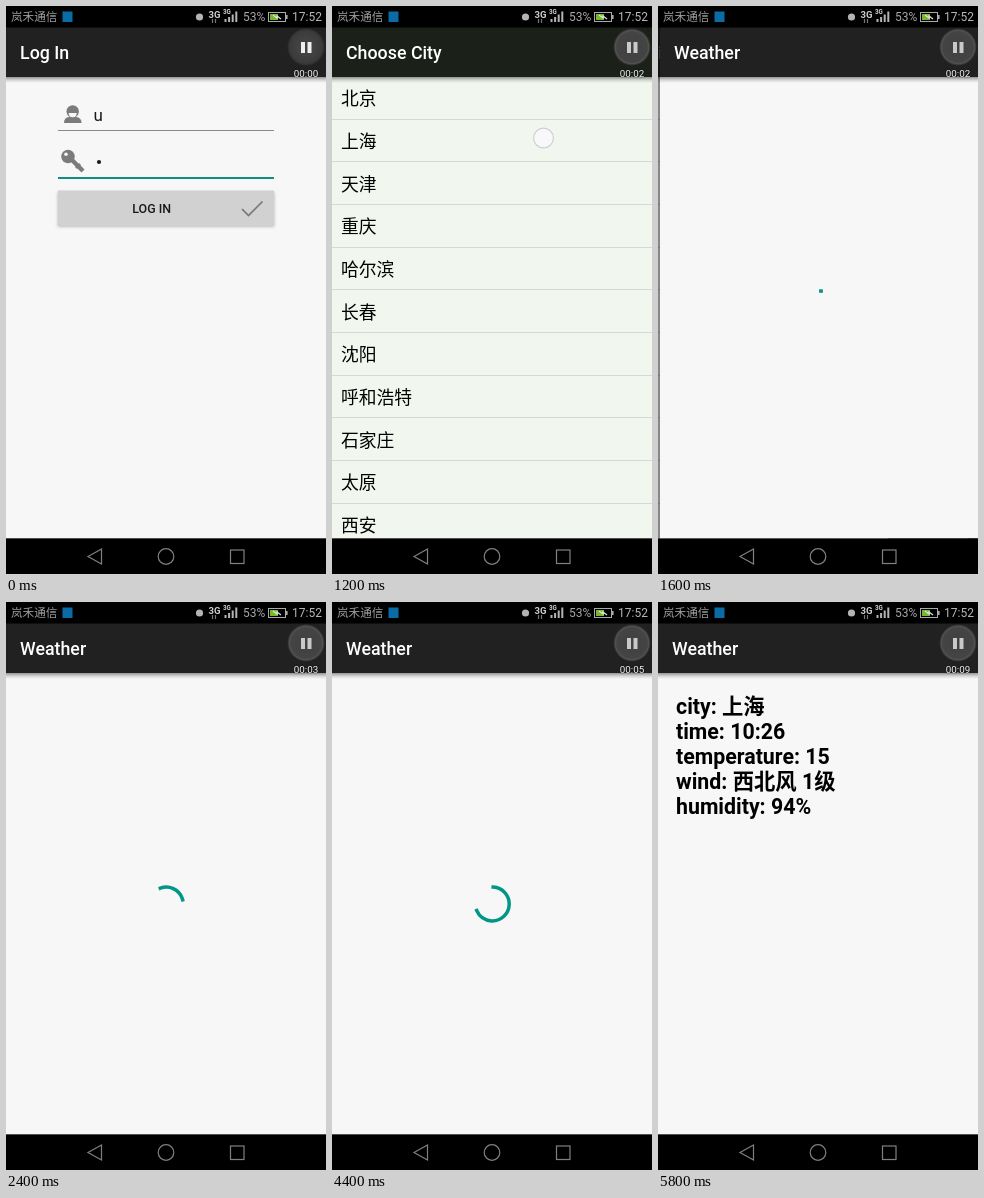
An HTML page with a canvas that plays this animation: 320x568 px, repeating every 6000 ms.

```html
<!DOCTYPE html>
<html lang="zh-CN">
<head>
<meta charset="utf-8">
<title>Weather app</title>
<style>
html, body { margin: 0; width: 100%; height: 100%; overflow: hidden; background: #000; }
canvas { display: block; width: 320px; height: 568px; }
</style>
</head>
<body>
<canvas id="stage" width="320" height="568"></canvas>
<script>
const ctx = document.getElementById('stage').getContext('2d');
const FONT = 'Roboto, "Noto Sans CJK SC", "Noto Sans CJK", sans-serif';
const W = 320, TOP = 71, BOTTOM = 532.5, LOOP = 6000, STEP = 200;
const TEAL = '#009688';
const CITIES = ['北京', '上海', '天津', '重庆', '哈尔滨', '长春', '沈阳', '呼和浩特', '石家庄', '太原', '西安'];
const REPORT = ['city: 上海', 'time: 10:26', 'temperature: 15', 'wind: 西北风 1级', 'humidity: 94%'];

function rect(x, y, w, h, color) {
  ctx.fillStyle = color;
  ctx.fillRect(x, y, w, h);
}

function disc(x, y, r, color) {
  ctx.fillStyle = color;
  ctx.beginPath();
  ctx.arc(x, y, r, 0, Math.PI * 2);
  ctx.fill();
}

function text(str, x, y, size, color, weight = 400, align = 'left') {
  ctx.font = `${weight} ${size}px ${FONT}`;
  ctx.textAlign = align;
  ctx.fillStyle = color;
  ctx.fillText(str, x, y);
}

function line(points, color, width, close) {
  ctx.beginPath();
  points.forEach(([x, y], i) => i ? ctx.lineTo(x, y) : ctx.moveTo(x, y));
  if (close) ctx.closePath();
  ctx.strokeStyle = color;
  ctx.lineWidth = width;
  ctx.lineCap = 'butt';
  ctx.stroke();
}

// cubic-bezier(.4, 0, .2, 1)
function ease(x) {
  if (x <= 0) return 0;
  if (x >= 1) return 1;
  let lo = 0, hi = 1, s = 0.5;
  for (let i = 0; i < 24; i++) {
    s = (lo + hi) / 2;
    const v = 1.2 * s * (1 - s) ** 2 + 0.6 * s * s * (1 - s) + s ** 3;
    if (v < x) lo = s; else hi = s;
  }
  return 3 * s * s * (1 - s) + s ** 3;
}

// Indeterminate ring: the head runs ahead, then the tail catches up
function spinner(ms) {
  const cycles = ms / 1333, k = Math.floor(cycles), p = cycles - k;
  const base = -90 + 144 * k + 234 * p;
  const tail = base + 270 * ease(p * 2 - 1);
  const head = base + 270 * ease(p * 2);
  const rad = Math.PI / 180;
  ctx.beginPath();
  ctx.arc(160.3, 302, 16.9, tail * rad, Math.max(head, tail + 1) * rad);
  ctx.strokeStyle = TEAL;
  ctx.lineWidth = 3.5;
  ctx.lineCap = 'square';
  ctx.stroke();
}

function page(title, bg = '#f7f7f7', bar = '#212121') {
  rect(0, 21, W, BOTTOM - 21, bg);
  const shade = ctx.createLinearGradient(0, TOP, 0, TOP + 6);
  shade.addColorStop(0, 'rgba(0,0,0,.4)');
  shade.addColorStop(0.5, 'rgba(0,0,0,.14)');
  shade.addColorStop(1, 'rgba(0,0,0,0)');
  rect(0, TOP, W, 6, shade);
  rect(0, 21, W, TOP - 21, bar);
  text(title, 14, 53, 17.8, '#fff', 500);
}

function userIcon() {
  const c = '#7b7b7b';
  ctx.fillStyle = c;
  ctx.beginPath();
  ctx.moveTo(58, 117);
  ctx.quadraticCurveTo(58, 111.5, 63, 111);
  ctx.lineTo(70, 111);
  ctx.quadraticCurveTo(75.5, 111.5, 75.5, 117);
  ctx.fill();
  disc(66.7, 105.5, 6.2, c);
  ctx.fillStyle = '#f7f7f7';
  ctx.beginPath();
  ctx.ellipse(66.7, 107, 4, 4.2, 0, 0, Math.PI);
  ctx.fill();
}

function keyIcon() {
  const c = '#7b7b7b';
  line([[64, 152], [77, 165]], c, 4.4);
  line([[70, 162], [74, 158]], c, 3);
  disc(62, 150.5, 6.8, c);
  disc(60, 148.3, 1.8, '#f7f7f7');
}

function loginPage(pressed, spin) {
  page('Log In');
  userIcon();
  text('u', 87.5, 115, 17, '#1a1a1a');
  rect(52, 124, 216, 1, '#8a8a8a');
  keyIcon();
  disc(93, 156, 2.1, '#1a1a1a');
  rect(52, 171, 216, 2, '#128c80');
  ctx.save();
  ctx.shadowColor = 'rgba(0,0,0,.3)';
  ctx.shadowBlur = 3;
  ctx.shadowOffsetY = 1;
  rect(52, 184.5, 216, 35.5, pressed ? '#cbcbcb' : '#d1d1d1');
  ctx.restore();
  text('LOG IN', 145.7, 207, 12.45, '#1a1a1a', 500, 'center');
  line([[236, 203], [242.5, 209.5], [256.5, 195.5]], '#777', 1.7);
  if (spin >= 0) spinner(spin);
}

function cityPage(settled) {
  if (settled) page('Choose City', '#f1f7ef', '#1b2019');
  else page('Choose City', '#f4f4f4', '#1f1f1f');
  CITIES.forEach((name, i) => {
    const y = TOP + i * 42.67;
    text(name, 9, y + 28.2, 17.8, '#000', 500);
    rect(0, Math.floor(y + 42), W, 1, '#d9d6d9');
  });
}

function weatherPage(spin, done) {
  page('Weather');
  if (done) REPORT.forEach((s, i) => text(s, 18, 112 + i * 25, 21.33, '#000', 700));
  else if (spin >= 0) spinner(spin);
}

function slide(below, above, x, shift, dim) {
  ctx.save();
  ctx.translate(-shift, 0);
  below();
  ctx.restore();
  rect(0, 21, x, BOTTOM - 21, `rgba(0,0,0,${dim})`);
  ctx.save();
  ctx.beginPath();
  ctx.rect(x, 21, W - x, BOTTOM - 21);
  ctx.clip();
  ctx.translate(x, 0);
  above();
  ctx.restore();
}

function statusBar() {
  const c = '#b4b4b4';
  rect(0, 0, W, 21.5, '#000');
  text('岚禾通信', 5, 15.2, 11.6, '#a0a0a0');
  rect(56.5, 5.5, 10, 10.5, '#0b6ca5');
  disc(193.5, 11, 3.6, c);
  text('3G', 202.5, 11.5, 9.5, '#d0d0d0', 700);
  line([[206.5, 13], [206.5, 17]], '#777', 1.2);
  line([[209.5, 13], [209.5, 17]], '#777', 1.2);
  text('3G', 217, 8, 6.3, '#d0d0d0', 700);
  for (let i = 0; i < 4; i++) {
    const h = [3, 5, 7.5, 10.5][i];
    rect(218.5 + i * 3.6, 16 - h, 2, h, c);
  }
  text('53%', 237, 15.3, 12, '#a8a8a8');
  ctx.strokeStyle = '#aaa';
  ctx.lineWidth = 1;
  ctx.strokeRect(262.5, 6.5, 17, 9);
  rect(280, 9, 1.6, 4, '#aaa');
  rect(264, 8, 8, 6, '#76b82a');
  line([[267, 9], [271, 12], [271, 10], [275, 13]], '#e0e0e0', 1.2);
  text('17:52', 286, 15.3, 12, '#b8b8b8');
}

function navBar() {
  const c = '#808080';
  rect(0, BOTTOM, W, 568 - BOTTOM, '#000');
  line([[82, 550.5], [95.5, 543], [95.5, 558]], c, 1.2, true);
  ctx.beginPath();
  ctx.arc(160, 550.5, 7.8, 0, Math.PI * 2);
  ctx.stroke();
  ctx.strokeRect(224.5, 544, 13.5, 13.5);
}

function recorder(sec, bright) {
  const glow = ctx.createRadialGradient(300, 41, 8, 300, 41, 19);
  glow.addColorStop(0, '#424242');
  glow.addColorStop(0.65, bright ? '#444' : '#3c3c3c');
  glow.addColorStop(0.8, bright ? '#525252' : '#383838');
  glow.addColorStop(1, 'rgba(60,60,60,0)');
  disc(300, 41, 19, glow);
  const c = bright ? '#c9c9c9' : '#f0f0f0';
  rect(295, 36, 4, 11, c);
  rect(301.5, 36, 4, 11, c);
  ctx.save();
  ctx.shadowColor = 'rgba(0,0,0,.8)';
  ctx.shadowBlur = 2;
  text('00:0' + sec, 300, 71.3, 9.8, '#f2f2f2', 400, 'center');
  ctx.restore();
}

// Loading time in ms; it ran slightly faster on the first stretch
function loadTime(t) {
  return t < 3400 ? 10 + (t - 1600) / 1800 * 2100 : 2110 + (t - 3400) * 0.983;
}

function seconds(t) {
  if (t < 800) return 0;
  if (t < 1200) return 1;
  if (t < 1600) return 2;
  if (t < 5000) return Math.floor(2.5 + loadTime(t) / 1000);
  return 6 + Math.max(0, Math.floor((t - 5200) / STEP));
}

function draw(now) {
  const t = Math.floor((now % LOOP) / STEP) * STEP;
  const city = () => cityPage(t >= 1000);
  const weather = () => weatherPage(t < 1600 ? -1 : loadTime(t), t >= 5000);

  if (t < 600) loginPage(t >= 400, -1);
  else if (t < 800) slide(() => loginPage(false, 85), city, 178, 10, 0.035);
  else if (t < 1000) slide(() => loginPage(false, 290), city, 2, 90, 0.45);
  else if (t < 1400) city();
  else if (t < 1600) slide(city, weather, 178, 10, 0.035);
  else if (t < 1800) slide(city, weather, 2, 90, 0.45);
  else weather();

  if (t === 1200) {
    disc(211.5, 132, 10.5, '#cfcfd3');
    disc(211.5, 132, 9.3, '#f8f8fa');
  }
  statusBar();
  navBar();
  recorder(seconds(t), t >= 1000);
}

const start = performance.now();
function tick(now) {
  draw(Math.max(0, now - start));
  requestAnimationFrame(tick);
}
draw(0);
requestAnimationFrame(tick);
</script>
</body>
</html>
```
